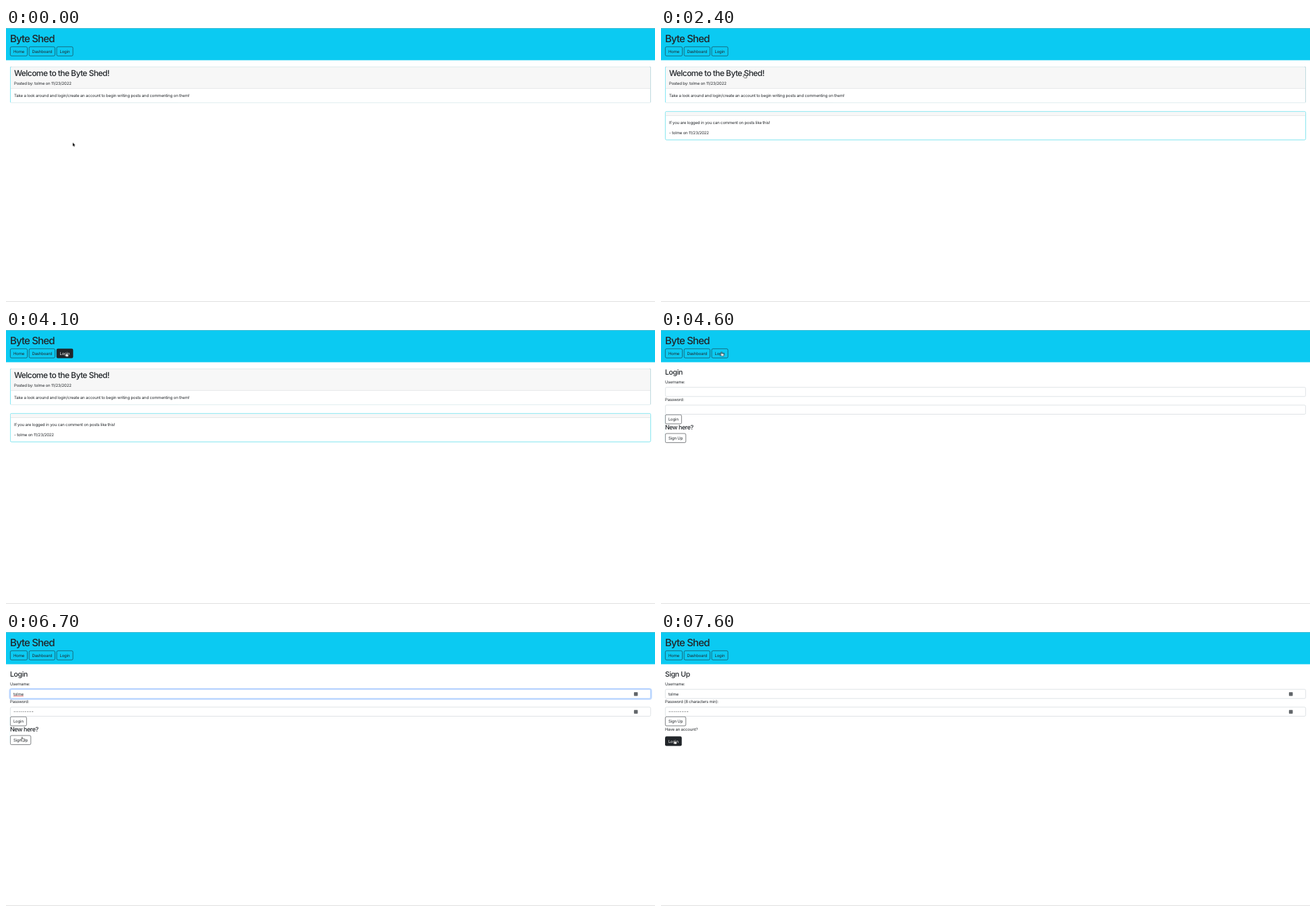
Write an HTML page that moves like this. It is 960x405 px and loops after 8000 ms.

```html
<!DOCTYPE html>
<html lang="en">
<head>
<meta charset="utf-8">
<title>Blog walkthrough</title>
<style>
  html, body { margin: 0; width: 100%; height: 100%; overflow: hidden; background: #fff; }
  * { box-sizing: border-box; }

  /* The page is laid out at 2560 x 1080 and shown at 37.5 %. */
  .screen {
    position: absolute; left: 0; top: 0; width: 2560px; height: 1080px; padding-top: 1px;
    transform: scale(.375); transform-origin: 0 0; overflow: hidden;
    font: 16px/24px Inter, "Open Sans", sans-serif; letter-spacing: -.025em;
    font-optical-sizing: none; text-rendering: geometricPrecision;
    color: #212529; background: #fff; white-space: nowrap;
  }
  .screen::before, .screen::after { content: ""; position: absolute; left: 0; width: 100%; }
  .screen::before { top: 0; height: 2px; background: #56b4c8; }
  .screen::after { bottom: 0; height: 3px; background: #e2e2e2; }

  h1, h2, h3, h4, p { margin: 0; }
  h1, h2, h3, h4 { font-weight: 500; line-height: 1.2; margin-bottom: 8px; }
  h1 { font-size: 40px; letter-spacing: -.057em; }
  h2 { font-size: 32px; letter-spacing: -.047em; }
  h3 { font-size: 28px; letter-spacing: -.034em; }
  h4 { font-size: 24px; letter-spacing: -.05em; }

  header { height: 126px; padding: 16px; background: #0bcaf2; }
  nav { display: flex; gap: 4.3px; }
  .btn {
    display: block; width: max-content; height: 38px; padding: 5px 11px;
    border: 2px solid rgba(33, 37, 41, .75); border-radius: 6px;
  }

  .page { position: absolute; left: 16px; top: 151px; width: 2528px; }
  .card { border: 2px solid #5cdcea; border-radius: 6px; overflow: hidden; }
  .card.post { border-color: #a9cdd3; border-left-color: #5cdff2; }
  .head { padding: 7px 14px; background: #f7f7f7; border-bottom: 2px solid #dfe3e4; }
  .body { padding: 15px 14px; }
  .card.comment { margin-top: 33px; }
  .comment .body p + p { margin-top: 16px; }

  label { display: block; margin-bottom: 8px; }
  .field {
    position: relative; height: 38px; padding: 5px 11px;
    border: 2px solid #d5dade; border-radius: 6px;
  }
  .icon { position: absolute; right: 50px; top: 10px; width: 15px; height: 15px; border-radius: 2px; background: #62666a; }
  .dots {
    display: block; width: 80px; height: 24px;
    background: radial-gradient(circle, #212529 1.7px, transparent 2.3px) 0 0 / 7.27px 24px;
  }
  .caret { display: inline-block; width: 2px; height: 19px; margin-left: 1px; vertical-align: -4px; background: #212529; }
  .name { text-decoration: underline 2px transparent; text-underline-offset: 2px; }
  .gap { margin-bottom: 16px; }

  /* Page changes */
  .home { animation: home 8s step-end infinite; }
  .comment { animation: comment 8s step-end infinite; }
  .login { animation: login 8s step-end infinite; }
  .signup { animation: signup 8s step-end infinite; }
  .login .fill { animation: loginFill 8s step-end infinite; }
  .signup .fill { animation: signupFill 8s step-end infinite; }
  @keyframes home { 0% { visibility: visible } 57.5%, 100% { visibility: hidden } }
  @keyframes comment { 0%, 57.5%, 100% { visibility: hidden } 30% { visibility: visible } }
  @keyframes login { 0%, 91.25%, 100% { visibility: hidden } 57.5% { visibility: visible } }
  @keyframes signup { 0% { visibility: hidden } 91.25%, 100% { visibility: visible } }
  @keyframes loginFill { 0%, 91.25%, 100% { visibility: hidden } 61.25% { visibility: visible } }
  @keyframes signupFill { 0% { visibility: hidden } 93.75%, 100% { visibility: visible } }

  /* Focus and hover */
  .focus { animation: focus 8s linear infinite; }
  .login .name { animation: loginFill 8s step-end infinite, spell 8s step-end infinite; }
  .caret { animation: caret 8s step-end infinite; }
  .to-login { animation: toLogin 8s linear infinite; }
  .to-signup { animation: toSignup 8s linear infinite; }
  .back { animation: back 8s linear infinite; }
  @keyframes focus {
    0%, 72.3%, 88.75%, 100% { border-color: #d5dade; box-shadow: 0 0 0 0 rgba(13, 110, 253, 0) }
    75%, 87.5% { border-color: #86b7fe; box-shadow: 0 0 0 4px rgba(13, 110, 253, .25) }
  }
  @keyframes spell {
    0%, 91.25%, 100% { text-decoration-color: transparent }
    72.5% { text-decoration-color: #e5484d }
  }
  @keyframes caret {
    0%, 80%, 88%, 100% { visibility: hidden }
    72.5%, 86.25% { visibility: visible }
  }
  @keyframes toLogin {
    0%, 19.3%, 22.5%, 45.2%, 57.5%, 57.8%, 64%, 100% { background: rgba(33, 37, 41, 0); color: #212529 }
    20%, 21%, 46.5%, 57.49%, 58.75%, 62.8% { background: #212529; color: #fff }
  }
  @keyframes toSignup {
    0%, 83.8% { background: rgba(33, 37, 41, 0); color: #212529 }
    85.2%, 100% { background: #212529; color: #fff }
  }
  @keyframes back {
    0%, 91.5% { background: rgba(33, 37, 41, 0); color: #212529 }
    93%, 100% { background: #212529; color: #fff }
  }

  /* Pointer */
  .pointer { position: absolute; left: 0; top: 0; width: 1px; height: 1px; overflow: visible; animation: move 8s linear infinite; }
  .arrow { animation: arrow 8s step-end infinite; }
  .hand { animation: hand 8s step-end infinite; }
  .beam { animation: beam 8s step-end infinite; }
  @keyframes move {
    0%, 12.5% { transform: translate(98.7px, 169.5px) }
    15% { transform: translate(62px, 118px) }
    17.5% { transform: translate(20px, 50px) }
    18.75% { transform: translate(45px, 18px) }
    20% { transform: translate(86px, 32px) }
    21.25% { transform: translate(145px, 36px) }
    22.5% { transform: translate(185px, 55px) }
    23.75%, 35% { transform: translate(123.2px, 68px) }
    36.25% { transform: translate(133px, 58px) }
    38.75% { transform: translate(95px, 17px) }
    41.25% { transform: translate(38px, 12px) }
    43.75% { transform: translate(21px, 17px) }
    46.25% { transform: translate(81px, 30.5px) }
    47.5%, 48.75% { transform: translate(84px, 31px) }
    50% { transform: translate(87px, 33px) }
    51.25%, 56.25% { transform: translate(88.8px, 33.5px) }
    57.5%, 62.5% { transform: translate(89.4px, 32.6px) }
    66.25% { transform: translate(64px, 70px) }
    70%, 78.75% { transform: translate(43px, 88px) }
    81.25% { transform: translate(37px, 115px) }
    83.75% { transform: translate(23.8px, 155.6px) }
    88.75%, 91.25% { transform: translate(23px, 156.5px) }
    95%, 100% { transform: translate(19.8px, 159.8px) }
  }
  @keyframes arrow {
    0%, 21.25%, 36.25%, 62.6%, 80%, 100% { visibility: visible }
    19.8%, 23.4%, 46%, 68.5%, 83% { visibility: hidden }
  }
  @keyframes hand {
    0%, 21.25%, 36.25%, 62.6% { visibility: hidden }
    19.8%, 23.4%, 46%, 83%, 100% { visibility: visible }
  }
  @keyframes beam {
    0%, 80%, 100% { visibility: hidden }
    68.5% { visibility: visible }
  }
</style>
</head>
<body>
<div class="screen">
  <header>
    <h1>Byte Shed</h1>
    <nav>
      <span class="btn">Home</span>
      <span class="btn">Dashboard</span>
      <span class="btn to-login">Login</span>
    </nav>
  </header>

  <main class="page home">
    <div class="card post">
      <div class="head">
        <h2>Welcome to the Byte Shed!</h2>
        <p>Posted by: tolme on 11/23/2022</p>
      </div>
      <div class="body">Take a look around and login/create an account to begin writing posts and commenting on them!</div>
    </div>
    <div class="card comment">
      <div class="head"></div>
      <div class="body">
        <p>If you are logged in you can comment on posts like this!</p>
        <p>- tolme on 11/23/2022</p>
      </div>
    </div>
  </main>

  <main class="page login">
    <h3>Login</h3>
    <label>Username:</label>
    <div class="field focus"><span class="name">tolme</span><i class="caret"></i><i class="icon fill"></i></div>
    <label>Password:</label>
    <div class="field"><span class="dots fill"></span><i class="icon fill"></i></div>
    <span class="btn">Login</span>
    <h4>New here?</h4>
    <span class="btn to-signup">Sign Up</span>
  </main>

  <main class="page signup">
    <h3>Sign Up</h3>
    <label>Username:</label>
    <div class="field"><span class="fill">tolme</span><i class="icon fill"></i></div>
    <label>Password (8 characters min):</label>
    <div class="field"><span class="dots fill"></span><i class="icon fill"></i></div>
    <span class="btn">Sign Up</span>
    <p class="gap">Have an account?</p>
    <span class="btn back">Login</span>
  </main>
</div>

<svg class="pointer" stroke-linejoin="round">
  <path class="arrow" d="M0 0V5.2L1.2 4.1 2 6 2.9 5.6 2.1 3.8H3.7Z" fill="#000" stroke="#fff" stroke-width=".5" paint-order="stroke"/>
  <path class="hand" d="M-.6 3.3V.4a.6.6 0 0 1 1.2 0V2l2.4.5q.8.2.7 1L3.3 5.9H.3L-1.7 3.8q-.3-.8.5-.8z" fill="#fff" stroke="#111" stroke-width=".6"/>
  <path class="beam" d="M-1-3q1 0 1 .8v4.4q0 .8-1 .8M1-3q-1 0-1 .8M0 2.2q0 .8 1 .8" fill="none" stroke="#222" stroke-width=".65"/>
</svg>
</body>
</html>
```
